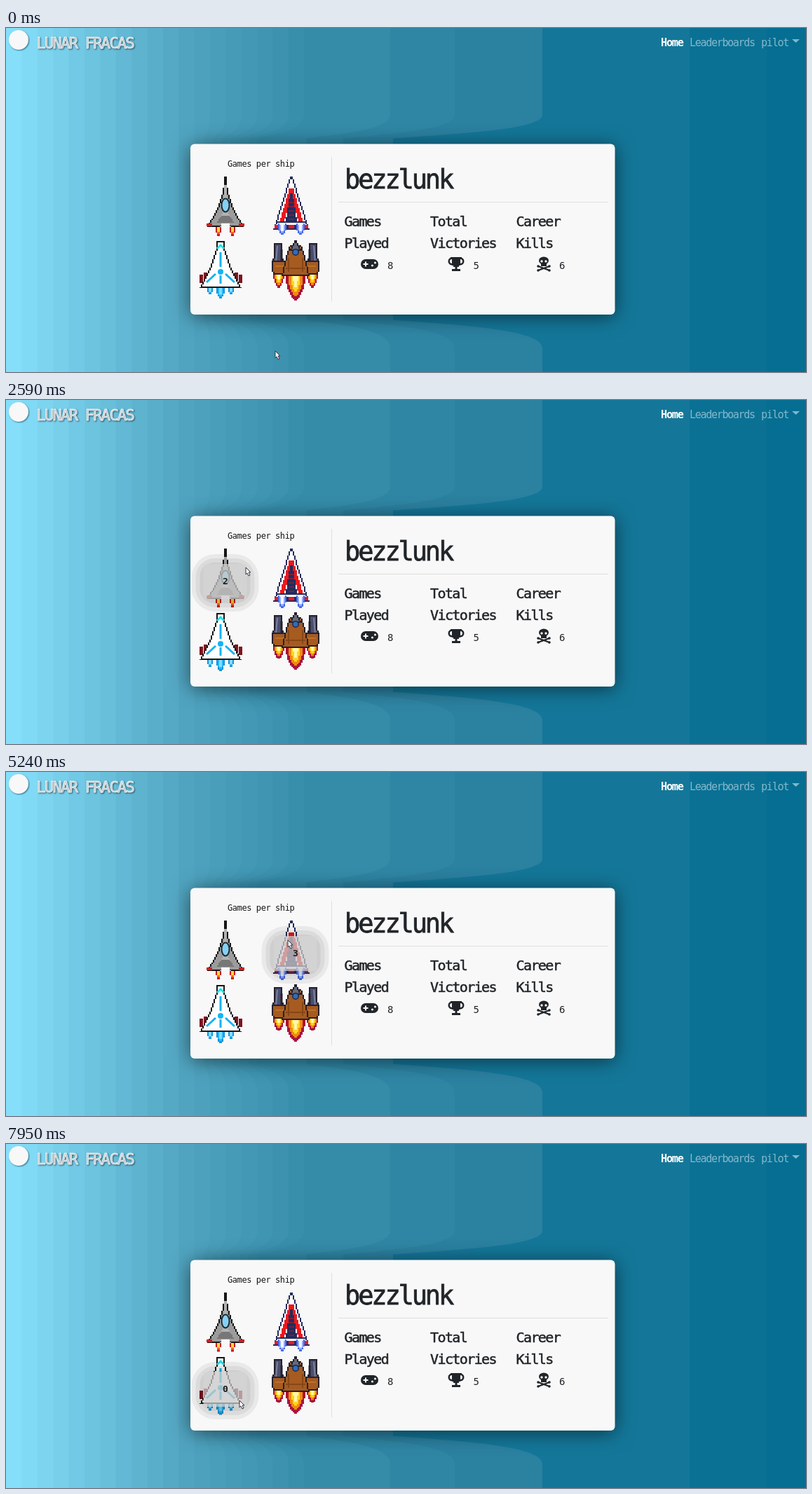
An HTML page with a canvas that plays this animation: 1141x491 px, repeating every 8000 ms.

```html
<!DOCTYPE html>
<html lang="en">
<head>
<meta charset="utf-8">
<title>Player card</title>
<style>
html, body { margin: 0; width: 100%; height: 100%; overflow: hidden; background: #2e82a0; }
canvas { display: block; }
</style>
</head>
<body>
<canvas id="stage" width="1141" height="491"></canvas>
<script>
const W = 1141, H = 491, LOOP = 8000;
const CARD = '#f8f8f8', INK = '#212529', BLACK = '#161616';
const TOP = 165.5, BOTTOM = 409;
const stage = document.getElementById('stage').getContext('2d');
const backdrop = document.createElement('canvas');
backdrop.width = W;
backdrop.height = H;
let g = backdrop.getContext('2d');

const mix = (a, b, k) => a + (b - a) * k;
const ramp = (t, a, b) => Math.max(0, Math.min(1, (t - a) / (b - a)));
const ease = k => k * k * (3 - 2 * k);

function rect(color, x, y, w, h) {
  g.fillStyle = color;
  g.fillRect(x, y, w, h);
}

// Rounded box around a centre.
function pill(color, cx, cy, w, h, r) {
  g.fillStyle = color;
  g.beginPath();
  g.roundRect(cx - w / 2, cy - h / 2, w, h, r);
  g.fill();
}

function disc(color, x, y, rx, ry = rx) {
  g.fillStyle = color;
  g.beginPath();
  g.ellipse(x, y, rx, ry, 0, 0, Math.PI * 2);
  g.fill();
}

function shape(color, ...pts) {
  g.fillStyle = color;
  g.beginPath();
  for (const [x, y] of pts) g.lineTo(x, y);
  g.closePath();
  g.fill();
}

function line(color, width, ...pts) {
  g.strokeStyle = color;
  g.lineWidth = width;
  g.beginPath();
  for (const [x, y] of pts) g.lineTo(x, y);
  g.stroke();
}

function text(str, x, y, size, color, { spacing = 0, weight = 'normal', heavy = 0 } = {}) {
  g.font = `${weight} ${size}px "DejaVu Sans Mono", monospace`;
  g.letterSpacing = spacing + 'px';
  g.fillStyle = g.strokeStyle = color;
  g.lineWidth = heavy;
  g.fillText(str, x, y);
  if (heavy) g.strokeText(str, x, y);
}

// Mirrored shape of 2px rows; its half width runs from w0 to w1 along a power curve.
function taper(cx, color, y0, y1, w0, w1, power = 1, inset = 0) {
  g.fillStyle = color;
  for (let y = y0 + inset; y < y1 - inset; y += 2) {
    const half = mix(w0, w1, ((y - y0) / (y1 - y0)) ** power);
    const w = Math.round(half / 2) * 2 - inset;
    if (w > 0) g.fillRect(cx - w, y, w * 2, Math.min(2, y1 - inset - y));
  }
}

function hull(edge, fill, cx, ...curve) {
  taper(cx, edge, ...curve);
  taper(cx, fill, ...curve, 2);
}

function flame(cx, y, len, w, colors) {
  colors.forEach((c, i) => taper(cx, c, y, y + len * (1 - i * 0.16), w * (1 - i * 0.25), 1, 2.5));
}

function both(cx, dx, draw) {
  draw(cx - dx, -1);
  draw(cx + dx, 1);
}

// ---- still parts ----

const SKY = [
  [0, 134, 223, 250], [240, 81, 165, 193], [425, 53, 140, 169],
  [640, 43, 129, 160], [765, 20, 119, 153], [W, 2, 108, 145]
];

function skyColor(x) {
  const i = SKY.findIndex(s => s[0] > x), a = SKY[i - 1], b = SKY[i];
  const k = ramp(x, a[0], b[0]);
  return `rgb(${[1, 2, 3].map(c => mix(a[c], b[c], k))})`;
}

// The card's shadow pulls the edges of the bands near it to the left.
function band(x) {
  const pull = x > 270 && x < 800 ? (x - 270) * 0.43 : 0;
  g.fillStyle = skyColor(x);
  g.beginPath();
  g.moveTo(x, 0);
  g.lineTo(x, TOP - 42);
  g.bezierCurveTo(x, TOP - 24, x - pull * 0.35, TOP - 17, x - pull, TOP - 8);
  g.lineTo(x - pull, BOTTOM + 8);
  g.bezierCurveTo(x - pull * 0.35, BOTTOM + 17, x, BOTTOM + 26, x, BOTTOM + 48);
  g.lineTo(x, H);
  g.lineTo(W, H);
  g.lineTo(W, 0);
  g.fill();
}

function gamepad(x, y) {
  pill(INK, x, y, 25, 14, 7);
  rect(CARD, x - 9, y - 1, 7, 2);
  rect(CARD, x - 6.5, y - 3.5, 2, 7);
  disc(CARD, x + 4, y + 2, 1.6);
  disc(CARD, x + 8, y - 2, 1.6);
}

function trophy(x, y) {
  both(x, 6, ear => {
    disc(INK, ear, y - 4, 5.5);
    disc(CARD, ear, y - 4, 3);
  });
  taper(x, INK, y - 10, y + 4, 7, 2, 3);
  rect(INK, x - 1.5, y + 3, 3, 5);
  rect(INK, x - 6, y + 7, 12, 3);
}

function skull(x, y) {
  disc(INK, x, y - 5, 7, 5.5);
  rect(INK, x - 4, y - 2, 8, 5);
  both(x, 3, eye => disc(CARD, eye, y - 4, 1.7));
  both(x, 8, (end, s) => {
    line(INK, 2.4, [end, y + 3], [x - s * 8, y + 9]);
    disc(INK, end, y + 3, 1.8);
    disc(INK, end, y + 9, 1.8);
  });
}

function drawBackdrop() {
  for (let n = 0; n < 19; n++) band(n * 22.4);
  [425, 548, 640, 765, 975, 1085].forEach(band);

  g.shadowColor = 'rgba(0,0,0,.55)';
  g.shadowBlur = 28;
  g.shadowOffsetY = 3;
  pill(CARD, 565.75, (TOP + BOTTOM) / 2, 605.5, BOTTOM - TOP, 6);
  g.shadowColor = 'rgba(0,40,60,.6)';
  g.shadowBlur = 2;
  g.shadowOffsetX = g.shadowOffsetY = 1;
  disc(CARD, 18, 17, 14);
  text('LUNAR FRACAS', 43.5, 28.5, 22, CARD, { spacing: -1.7, heavy: 0.9 });
  g.shadowColor = 'transparent';

  const faint = 'rgba(255,255,255,.5)';
  text('Home', 934, 26, 15, '#fff', { spacing: -1.15, weight: 'bold' });
  text('Leaderboards', 975, 26, 15, faint, { spacing: -1.3 });
  text('pilot', 1077, 26, 15, faint, { spacing: -1.2 });
  shape(faint, [1121, 16], [1132, 16], [1126.5, 21]);

  rect('#dfdfdf', 464, 184, 1, 206);
  rect('#dfdfdf', 474, 248, 385, 1);
  text('Games per ship', 316, 198, 12, BLACK, { spacing: -0.42 });
  text('bezzlunk', 483, 229, 37, INK, { spacing: -3.15, heavy: 0.8 });
  [['Games', 'Played', '8'], ['Total', 'Victories', '5'], ['Career', 'Kills', '6']]
    .forEach(([top, low, count], i) => {
      const x = 482.5 + i * 122.5, style = { spacing: -1.6, heavy: 0.5 };
      text(top, x, 283, 20, INK, style);
      text(low, x, 314, 20, INK, style);
      text(count, x + 61.5, 344, 14, INK);
    });
  gamepad(518.5, 337);
  trophy(642, 337);
  skull(767, 337);
}

// ---- ships; pulse is the present state of the engines, 0 to 2 ----

const FIRE = ['#a8123c', '#f08a10', '#ffd61e', '#fff6b0'];

function greyShip(pulse) {
  const cx = 313;
  both(cx, 10, x => flame(x, 278, 19 - pulse / 2, 4, ['#cc1720', '#f0661c', '#ffd93a']));
  hull(BLACK, '#9c9c9c', cx, 212, 284, 2, 28, 2);
  taper(cx, '#b2b2b2', 224, 276, 1, 6);
  taper(cx, '#777', 268, 278, 6, 14);
  taper(cx, CARD, 279, 284, 6, 8);
  both(cx, 23, x => rect('#d31b20', x - 4, 279, 8, 4));
  disc('#1d2b33', cx, 253, 6.5, 10.5);
  disc('#85d0f3', cx, 253, 4.5, 8.5);
}

function redShip(pulse) {
  const cx = 407, navy = '#232c5c', red = '#e9191f';
  hull(navy, '#fff', cx, 212, 288, 2, 26, 1);
  taper(cx, red, 229, 276, 3, 17);
  taper(cx, '#fff', 240, 276, 1, 10);
  taper(cx, navy, 236, 276, 2, 8);
  for (let y = 248; y < 274; y += 6) rect('#6d2540', cx - 4, y, 8, 2);
  rect(navy, cx - 22, 276, 44, 2);
  rect(red, cx - 24, 281, 48, 5);
  rect(navy, cx - 10, 281, 20, 7);
  rect(red, cx - 4, 281, 8, 5);
  both(cx, 13, x => flame(x, 279, 16 + pulse, 6, ['#4668e8', '#8faaff', '#f2f6ff']));
}

function whiteShip(pulse) {
  const cx = 306, blue = '#12b4f5', jet = ['#1592d8', '#22b8f8', '#85dcff'];
  both(cx, 15, x => flame(x, 369, 11 + pulse / 2, 4, jet));
  flame(cx, 369, 17 + pulse / 2, 6, jet);
  for (const dx of [22, 28]) {
    both(cx, dx, x => rect('#7d1520', x - 2, 338 + dx / 2, 5, 12));
  }
  hull(BLACK, '#fff', cx, 304, 371, 5, 30, 1.5);
  line('#25dfe8', 3, [cx - 5, 315], [cx, 310], [cx + 5, 315]);
  line(blue, 3, [cx, 320], [cx, 341]);
  line(blue, 3, [cx, 353], [cx, 365]);
  both(cx, 0, (x, s) => line(blue, 3, [x + s * 7, 351], [x + s * 20, 363]));
  disc(blue, cx, 348, 4);
}

function brownShip(pulse) {
  const cx = 413, dark = '#26202a', brown = '#a65b20', dim = pulse ? 4 : 0;
  both(cx, 24, x => flame(x, 346, 25 - dim / 2, 8, FIRE));
  flame(cx, 349, 40 - dim, 14, FIRE);
  both(cx, 25, (x, s) => {
    hull(dark, '#4a4f70', x, 307, 340, 5, 8, 1);
    line('#7d82a0', 2, [x + s, 311], [x + s * 3, 334]);
    line(dark, 3, [x - s * 5, 316], [x - s * 5, 336]);
  });
  hull(dark, brown, cx, 332, 352, 34, 30, 4);
  hull(dark, brown, cx, 310, 354, 8, 20, 0.7);
  both(cx, 23, x => rect('#bd702c', x - 6, 339, 12, 2));
  both(cx, 10, x => rect('#874617', x - 1, 328, 2, 20));
  rect('#874617', cx - 14, 342, 28, 2);
  hull(dark, '#666a78', cx, 303, 318, 2, 9, 1);
  disc('#202a4c', cx, 320, 5);
  disc('#2f6cb8', cx, 320, 3.5);
}

const SHIPS = [greyShip, redShip, whiteShip, brownShip];

// ---- pointer and hover ----

// Start and end of each move, and where it leads.
const MOVES = [
  [1000, 1700, 300, 255], [2250, 2720, 352, 235], [3520, 4020, 402, 240],
  [5300, 6260, 310, 347], [6950, 7400, 333, 366]
];

function pointerAt(t) {
  let x = 384, y = 461;
  for (const [from, to, toX, toY] of MOVES) {
    const k = ease(ramp(t, from, to));
    x = mix(x, toX, k);
    y = mix(y, toY, k);
  }
  return [Math.round(x), Math.round(y)];
}

function pointer(x, y) {
  const tip = [[0, 0], [0, 10], [2, 8], [4, 12], [6, 11], [4, 7], [7, 7], [0, 0]]
    .map(([dx, dy]) => [x + dx, y + dy]);
  shape('#fff', ...tip);
  line('#33333f', 1, ...tip);
}

const FADE = 260;
// Centre, count, start of fade in and of fade out.
const HOVERS = [
  [312.5, 261, '2', 1620, 3560],
  [412.5, 261, '3', 3850, 5350],
  [312.5, 352, '0', 6000, LOOP]
];

function hover(t, [cx, cy, count, show, hide]) {
  g.globalAlpha = ramp(t, show, show + FADE) * (1 - ramp(t, hide, hide + FADE));
  for (let i = 0; i < 3; i++) {
    pill('rgba(0,0,0,.06)', cx, cy, 96 - i * 12, 82 - i * 12, 34 - i * 7);
  }
  rect('rgba(214,214,214,.7)', cx - 31, cy - 27, 62, 50);
  text(count, cx - 3.5, cy + 1.5, 13, '#1c1c1c', { weight: 'bold' });
  g.globalAlpha = 1;
}

function draw(t) {
  const pulse = Math.floor((t + 18) / 36.67) % 3;
  g.drawImage(backdrop, 0, 0);
  SHIPS.forEach(ship => ship(pulse));
  HOVERS.forEach(h => hover(t, h));
  pointer(...pointerAt(t));
}

let start;
function tick(now) {
  start ??= now;
  draw((now - start) % LOOP);
  requestAnimationFrame(tick);
}

drawBackdrop();
g = stage;
draw(0);
requestAnimationFrame(tick);
</script>
</body>
</html>
```
